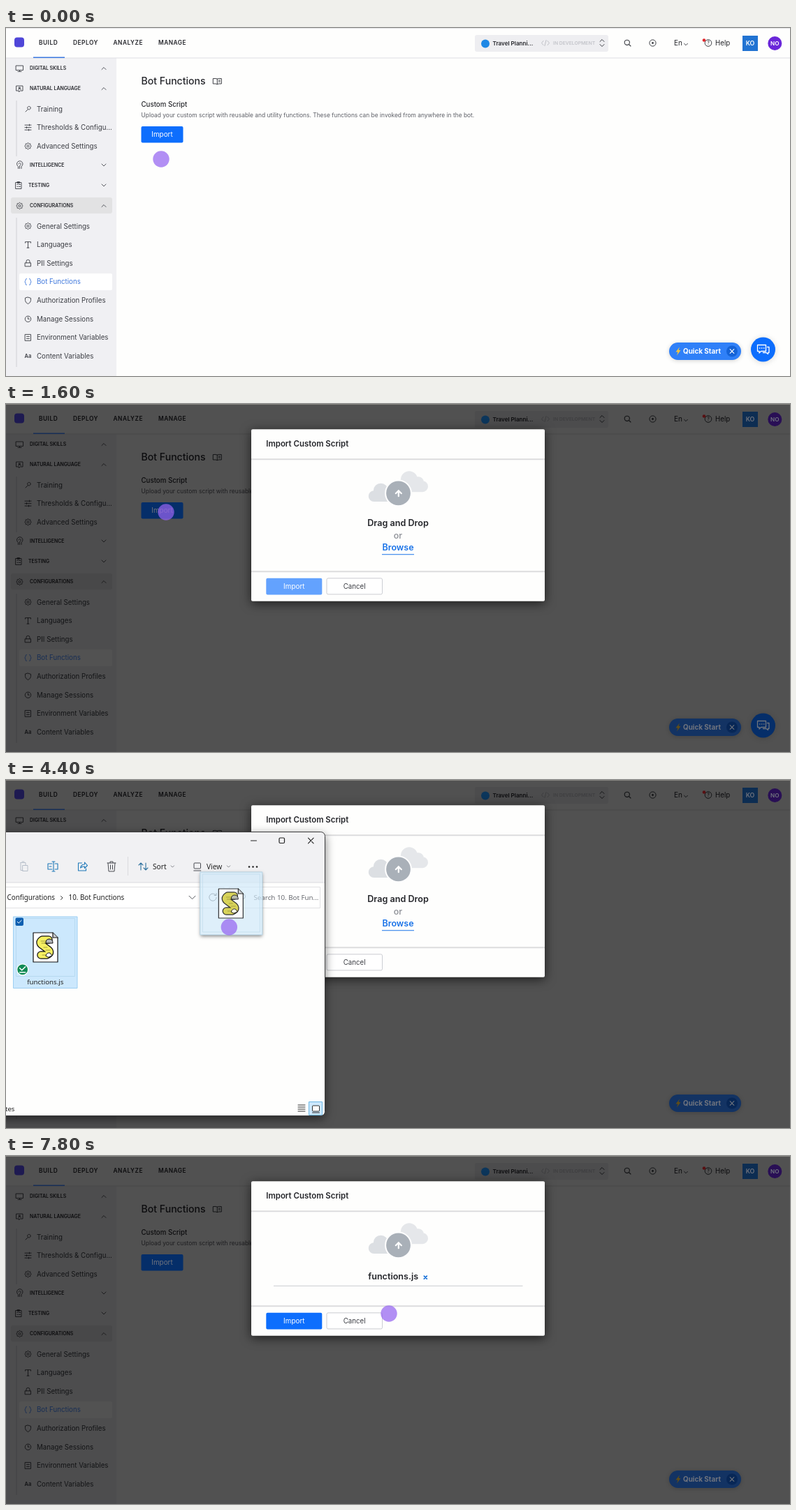
These frames come from a looping animation (1122x499 px, 8 s). An HTML page with a canvas:

```html
<!DOCTYPE html>
<html lang="en">
<head>
<meta charset="utf-8">
<title>Import custom script</title>
<style>
html, body { margin: 0; width: 100%; height: 100%; overflow: hidden; background: #fefefe; }
canvas { display: block; }
</style>
</head>
<body>
<canvas id="stage" width="1122" height="499"></canvas>
<script>
const ctx = document.getElementById('stage').getContext('2d');
const LOOP = 8000, STEP = 200, TAU = Math.PI * 2;
const UI = 'Inter, sans-serif', SYSTEM = '"Noto Sans", "Open Sans", sans-serif';
const BLUE = '#0d6efd', INK = '#25262b', SOFT = '#3c3e44', PAPER = '#fefefd';
let dimmed = false;

// Saturated colours stay a little brighter than greys behind the modal.
function tone(hex) {
  if (!dimmed) return hex;
  const rgb = [1, 3, 5].map(i => parseInt(hex.slice(i, i + 2), 16));
  const k = 0.32 + 0.1 * (Math.max(...rgb) - Math.min(...rgb)) / 255;
  return `rgb(${rgb.map(v => Math.round(v * k))})`;
}
const onAccent = () => dimmed ? '#70747e' : '#ffffff';

function text(s, x, y, size, color = INK, weight = 400, opt = {}) {
  ctx.font = `${weight} ${size}px ${opt.font || UI}`;
  ctx.textAlign = opt.align || 'left';
  ctx.letterSpacing = (opt.spacing || 0) + 'px';
  ctx.fillStyle = color;
  ctx.fillText(s, x, y + size * 0.36);
}
function box(x, y, w, h, fill, r = 0, stroke, lw = 1) {
  ctx.beginPath();
  ctx.roundRect(x, y, w, h, r);
  if (fill) { ctx.fillStyle = fill; ctx.fill(); }
  if (stroke) { ctx.strokeStyle = stroke; ctx.lineWidth = lw; ctx.stroke(); }
}
function disc(x, y, r, fill, stroke, lw = 1) {
  ctx.beginPath();
  ctx.arc(x, y, r, 0, TAU);
  if (fill) { ctx.fillStyle = fill; ctx.fill(); }
  if (stroke) { ctx.strokeStyle = stroke; ctx.lineWidth = lw; ctx.stroke(); }
}
function path(d, x, y, color, lw = 1, fill) {
  const p = new Path2D(d);
  ctx.save();
  ctx.translate(x, y);
  ctx.lineCap = ctx.lineJoin = 'round';
  if (fill) { ctx.fillStyle = fill; ctx.fill(p); }
  if (color) { ctx.strokeStyle = color; ctx.lineWidth = lw; ctx.stroke(p); }
  ctx.restore();
}
function shadowed(color, blur, dy, draw) {
  ctx.save();
  ctx.shadowColor = color;
  ctx.shadowBlur = blur;
  ctx.shadowOffsetY = dy;
  draw();
  ctx.restore();
}
const chevron = (x, y, up, color, s = 3) =>
  path(`M${-s} ${up ? s / 2 : -s / 2}L0 ${up ? -s / 2 : s / 2}L${s} ${up ? s / 2 : -s / 2}`, x, y, color);
const cross = (x, y, s, color, lw) => path(`M${-s} ${-s}L${s} ${s}M${s} ${-s}L${-s} ${s}`, x, y, color, lw);

const icons = {
  screen: 'M-5 -4H5V2.500H-5ZM0 2.500V4.500M-2.500 4.500H2.500',
  speech: 'M-4.500 -4H4.500V3H1L-1 4.500V3H-4.500ZM-2 1Q0 -1 2 1M-.8 -2H.8V-.5H-.8Z',
  head: 'M-2 5V2A4.200 4.200 0 1 1 2.500 2V5M-1.500 -1.500A1.600 1.600 0 1 1 1 0L0 1.500V5',
  clipboard: 'M-4 -4H4V5H-4ZM-1.500 -5H1.500V-3H-1.500ZM-2 -1H-1M.5 -1H2.500M-2 2H-1M.5 2H2.500',
  wrench: 'M-3.500 4L0 .5M0 .5A2.300 2.300 0 1 1 1.500 1Z',
  sliders: 'M-4.500 -3.500H4.500M-4.500 0H4.500M-4.500 3.500H4.500M2 -4.500V-2.500M-2 -1V1M1 2.500V4.500',
  letter: 'M-4 -2.500V-4H4V-2.500M0 -4V4.500M-1.500 4.500H1.500',
  lock: 'M-4 -.5H4V4.500H-4ZM-2.500 -.5V-2.500A2.500 2.500 0 0 1 2.500 -2.500V-.5',
  braces: 'M-2 -4.500Q-3.500 -4.500 -3.500 -2.500T-4.800 0Q-3.500 0 -3.500 2.500T-2 4.500M2 -4.500Q3.500 -4.500 3.500 -2.500T4.800 0Q3.500 0 3.500 2.500T2 4.500',
  shield: 'M0 -4.500L4 -3.200V0Q4 3 0 5Q-4 3 -4 0V-3.200Z',
  page: 'M-4 -4.500H4V4.500H-4ZM-2 -1.500H2M-2 1.500H2'
};
function icon(name, x, y, color) {
  if (name === 'gear') {
    disc(x, y, 1.5, null, color, 0.9);
    ctx.beginPath();
    for (let i = 0; i <= 48; i++) {
      const a = i / 48 * TAU, r = 4.1 + 0.6 * Math.cos(a * 8);
      ctx.lineTo(x + r * Math.cos(a), y + r * Math.sin(a));
    }
    ctx.stroke();
  } else if (name === 'clock') {
    disc(x, y, 4.2, null, color, 0.9);
    path('M0 -2.500V0H2', x, y, color, 0.9);
  } else if (name === 'Aa') text('Aa', x, y, 7.5, color, 600, { align: 'center' });
  else path(icons[name], x, y, color, 0.9);
}

const groups = [
  ['DIGITAL SKILLS', 58, 'screen', true], ['NATURAL LANGUAGE', 87, 'speech', true],
  ['INTELLIGENCE', 196.5, 'head', false], ['TESTING', 225.5, 'clipboard', false],
  ['CONFIGURATIONS', 255, 'gear', true]
];
const languageItems = [['Training', 'wrench'], ['Thresholds & Configu...', 'sliders'], ['Advanced Settings', 'gear']];
const configItems = [
  ['General Settings', 'gear'], ['Languages', 'letter'], ['PII Settings', 'lock'], ['Bot Functions', 'braces'],
  ['Authorization Profiles', 'shield'], ['Manage Sessions', 'clock'], ['Environment Variables', 'page'], ['Content Variables', 'Aa']
];

function sidebar() {
  box(0, 43, 158, 456, tone('#f0f0f3'));
  box(7, 243, 145, 23, tone('#e2e2e3'), 3);
  box(19, 352, 133, 24, tone('#ffffff'), 2);
  box(14.5, 104, 1, 80, tone('#cfcfd5'));
  box(14.5, 272, 1, 214, tone('#cfcfd5'));
  for (const [label, y, name, open] of groups) {
    icon(name, label === 'TESTING' ? 18 : 19.5, y, tone(SOFT));
    text(label, label === 'TESTING' ? 32 : 34, y, 6.92, tone(INK), 600);
    chevron(140, y, open, tone('#55575e'));
  }
  const rows = (items, top) => items.forEach(([label, name], i) => {
    const y = top + i * 26.65, color = tone(label === 'Bot Functions' ? '#3f78dc' : SOFT);
    icon(name, 31.5, y, color);
    text(label, 44, y, 9.73, color);
  });
  rows(languageItems, 116);
  rows(configItems, 284);
}

function header() {
  box(0, 42.5, 1122, 1, tone('#dfdfe3'));
  box(12, 13.5, 14, 14, tone('#4f46d8'), 4);
  [['BUILD', 47], ['DEPLOY', 96], ['ANALYZE', 153.5], ['MANAGE', 218]].forEach(([s, x]) =>
    text(s, x, 21, 8.34, tone(INK), 600, { spacing: 0.5 }));
  box(39, 41.5, 45, 1.6, tone('#3b78e0'));

  box(671, 10, 191, 24, tone('#eeeef1'), 3);
  disc(686, 22.5, 6, tone('#1e88e5'));
  text('Travel Planni...', 696.5, 22, 8.1, tone(INK), 600);
  path('M-3 -3L-5.500 0L-3 3M3 -3L5.500 0L3 3M1 -4L-1 4', 772, 21.5, tone('#b9bac0'), 0.9);
  text('IN DEVELOPMENT', 783, 21.5, 6.8, tone('#c3c4ca'), 600);
  chevron(853, 18, true, tone(SOFT));
  chevron(853, 25, false, tone(SOFT));

  disc(888.8, 20.8, 3.6, null, tone(SOFT), 1.1);
  path('M0 0L2.500 2.500', 891.5, 23.5, tone(SOFT), 1.1);
  disc(925.5, 21.5, 4.6, null, tone(SOFT));
  disc(925.5, 21.5, 1.4, tone(SOFT));
  text('En', 956, 21.5, 10, tone(INK));
  chevron(973, 23.5, false, tone(SOFT), 2.4);
  disc(1005, 21.5, 4.8, null, tone(SOFT));
  text('?', 1005, 21.5, 7, tone(SOFT), 500, { align: 'center' });
  disc(999, 17.5, 2.3, tone('#e0282e'));
  text('Help', 1015, 21.5, 9.73, tone(INK));
  box(1054, 11, 22, 22, tone('#2173d2'));
  text('KO', 1065, 21.5, 8.8, onAccent(), 600, { align: 'center' });
  disc(1100.3, 22, 10, tone('#6a26d9'));
  text('NO', 1100.3, 22, 8.2, onAccent(), 600, { align: 'center' });
}

function quickStart(withChat) {
  shadowed('rgba(0,0,0,.18)', 6, 1, () => box(949, 451, 103, 25, tone('#2f80f8'), 12.5));
  path('M2 -6L-3.500 1H-.5L-2 6L3.500 -1.500H.5Z', 962, 463.5, null, 1, tone('#f8c53a'));
  text('Quick Start', 969, 463.5, 9.9, onAccent(), 700);
  disc(1039, 463.5, 8, tone('#1463d8'));
  cross(1039, 463.5, 2.8, onAccent(), 1.1);
  if (!withChat) return;
  shadowed('rgba(0,0,0,.15)', 8, 1, () => disc(1083.5, 461, 17.5, tone(BLUE)));
  path('M-8 -6H4V3H-3L-5.500 5.500V3H-8ZM6 -3H8.500V5H7V7L4.500 5H0M-5 -1.500H-4.500M-2 -1.500H-1.500M1 -1.500H1.500', 1083.5, 460.5, onAccent(), 1.3);
}

function page(withChat) {
  box(0, 0, 1122, 499, tone(PAPER));
  sidebar();
  header();
  text('Bot Functions', 193.5, 75.8, 14.1, tone(INK), 500);
  path('M0 -3.500Q-2 -4.500 -6 -4V3.500Q-2 3 0 4.200Q2 3 6 3.500V-4Q2 -4.500 0 -3.500V4M2 -1.500H4M2 .5H4', 302.3, 76.5, tone(SOFT), 1);
  text('Custom Script', 193.5, 109.2, 9.7, tone(INK), 500);
  text('Upload your custom script with reusable and utility functions. These functions can be invoked from anywhere in the bot.',
    193.5, 124.8, 8.41, tone('#5c5e66'));
  box(193.5, 141, 60, 23.5, tone(BLUE), 2);
  text('Import', 223.5, 152.7, 9.9, onAccent(), 400, { align: 'center' });
  quickStart(withChat);
  box(0, 0, 1122, 1, dimmed ? '#84837f' : '#e4e4e6');
}

function cloud(x, y, s, color) {
  ctx.fillStyle = color;
  ctx.beginPath();
  for (const [dx, dy, r] of [[-14, 0, 9], [-3, -9, 12], [10, -5, 8], [16, 1, 8]]) {
    ctx.moveTo(x + dx * s, y + dy * s);
    ctx.arc(x + dx * s, y + dy * s, r * s, 0, TAU);
  }
  ctx.rect(x - 14 * s, y - 4 * s, 30 * s, 13 * s);
  ctx.fill();
}

function dialog(top, hasFile) {
  const foot = hasFile ? 179 : 204, height = hasFile ? 221.5 : 246.5;
  ctx.save();
  ctx.translate(0, top);
  shadowed('rgba(0,0,0,.65)', 15, 3, () => box(351, 0, 420, height, PAPER, 2));
  text('Import Custom Script', 372.3, 20.5, 11.45, INK, 600);
  for (const y of [42, foot - 1]) box(351, y, 420, 2, '#dcdcde');
  cloud(580, 81, 1, '#e5e7ea');
  cloud(539, 96, 0.88, '#dcdfe3');
  disc(561.5, 91.7, 18.4, '#a9b0b8', '#ffffff', 2);
  path('M0 4V-4M-4 0L0 -4L4 0', 561.8, 92, '#ffffff', 2.2);
  if (hasFile) {
    text('functions.js', 518.3, 136.3, 12.6, INK, 600);
    cross(600.3, 138, 2, '#1670d8', 1.7);
    box(383, 149.5, 356.5, 1, '#c9cbd0');
  } else {
    const mid = { align: 'center' };
    text('Drag and Drop', 561, 134, 12.6, INK, 600, mid);
    text('or', 561, 152.3, 12.5, '#8c8f96', 500, mid);
    text('Browse', 561, 169.7, 12.5, '#1a73e8', 600, mid);
    box(538, 179, 46, 1, '#1a73e8');
  }
  const by = foot + 9.5;
  box(372.3, by, 80, 23.7, hasFile ? BLUE : '#63a2fe', 2);
  text('Import', 412.3, by + 11.7, 9.9, '#ffffff', 400, { align: 'center' });
  box(459, by + 0.2, 79.5, 23, '#ffffff', 2, '#cbcdd2');
  text('Cancel', 498.7, by + 11.7, 9.73, SOFT, 400, { align: 'center' });
  ctx.restore();
}

function scriptIcon(x, y) {
  path('M-17 -21H11L18 -14V21H-17Z', x, y, '#111111', 1.2, '#ffffff');
  path('M11 -21V-14H18', x, y, '#111111', 1.2, '#c9ccd0');
  const scroll = 'M5 -11H-4Q-10 -7 -4 -3L4 3Q10 8 2 11H-6';
  path(scroll, x, y, '#111111', 11.5);
  path(scroll, x, y, '#f6f062', 9);
  path('M-6 -9H3M-5 -6H1M-2 0H3M1 4H7M-4 11H3', x, y, '#8f8a34', 0.8);
  path('M1 -7Q1 -12 6 -12Q11 -12 11 -6H3Z', x, y, '#111111', 1, '#b4b7bc');
  path('M1 12Q2 7 7 8L10 12L5 14Z', x, y, '#111111', 1, '#ffffff');
}

function explorer() {
  const sys = { font: SYSTEM }, line = '#4a4c52', accent = '#1f78b8';
  ctx.save();
  shadowed('rgba(0,0,0,.55)', 14, 4, () => box(-20, 74.5, 476.5, 407, PAPER, 6));
  ctx.beginPath();
  ctx.roundRect(-20, 74.5, 476.5, 407, 6);
  ctx.clip();
  box(0, 74, 458, 73, '#f1f1f3');
  box(0, 146.5, 458, 1, '#dcdce0');
  path('M0 0H8', 350.5, 87, '#222222');
  box(391, 83, 7.5, 7.5, null, 1.5, '#222222', 1.2);
  cross(436.3, 87, 3.8, '#222222', 1.1);

  path('M-4 -5H3V-1M-4 -5V6H-1M-1 -1H6V7H-1ZM-2 -6.500H1', 25, 123.5, '#b7bfca', 1);
  path('M-1 -4H-7V4H-1M3 -4H7V4H3M1 -7V7M-1 -7H3M-1 7H3M-5 0H-2', 67, 124, accent, 1.1);
  path('M-1 -5H-6V6H5V3M-3 2Q-2 -3 3 -3V-6L7 -1.500L3 2.500V0Q-1 0 -3 2Z', 109.5, 124, accent, 1.1);
  path('M-6 -5H6M-2 -5V-7H2V-5M-5 -5L-4 7H4L5 -5M-1.500 -2V4M1.500 -2V4', 151, 124, line, 1);
  box(174, 110, 1, 27, '#dadade');
  path('M-3 5V-5M-6 -2L-3 -5L0 -2M4 -5V5M1 2L4 5L7 2', 196, 124, '#31739f', 1.1);
  text('Sort', 210, 124, 10.2, '#222222', 400, sys);
  chevron(238.3, 124, false, '#85878c', 2.2);
  box(269, 119, 9.5, 8, null, 1, line);
  path('M0 0H10', 268.8, 130, line);
  text('View', 287, 124, 10.2, '#222222', 400, sys);
  chevron(318.5, 124, false, '#85878c', 2.2);
  for (const x of [348, 353.5, 359]) disc(x, 124.5, 1.3, '#222222');

  box(-10, 153.5, 322, 30, '#ffffff', 0, '#e1e1e4');
  box(319.5, 153.5, 130, 30, '#ffffff', 0, '#e1e1e4');
  text('Configurations', 1.5, 168.5, 9.85, '#222222', 400, sys);
  path('M-1.500 -2.500L1 0L-1.500 2.500', 80, 169, '#333333');
  text('10. Bot Functions', 89.5, 168.5, 9.85, '#222222', 400, sys);
  chevron(266.5, 168.5, false, '#55575c', 4.5);
  path('M4.500 -2.500A5.200 5.200 0 1 0 5.200 .5M5 -5.500V-2.500H2', 296, 168, '#55575c', 1);
  disc(339, 167, 3.4, null, '#777a80');
  path('M0 0L-4 4', 336.5, 169.5, '#777a80');
  text('Search 10. Bot Fun...', 354.5, 168.5, 9.75, '#66686e', 400, sys);

  box(10.5, 196, 91.5, 102.5, '#cce8fd', 0, '#9dcff2');
  box(14.5, 198.5, 84, 83, null, 0, '#b3d6ee', 0.8);
  box(13.5, 197.5, 11.5, 11.5, '#0d5fb0', 2);
  path('M-3 0L-1 2L3 -2', 19.2, 203.2, '#ffffff');
  scriptIcon(56, 240);
  disc(23.7, 271.8, 8, '#0f8a55', '#ffffff', 1.2);
  path('M-4 -2L-1 1L4 -4M-4 4H4', 23.7, 271.8, '#ffffff', 1.5);
  text('functions.js', 56.3, 289.5, 9.7, '#222222', 400, { ...sys, align: 'center' });

  text('tes', -1, 472, 9.6, '#222222', 400, sys);
  path('M0 0H10M0 3H10M0 6H10M0 9H10', 418, 466, '#333333');
  box(433.5, 461.5, 19, 19, '#cce8fd', 0, '#6db8e6');
  box(438.5, 467, 10, 8, '#ffffff', 1, '#333333');
  path('M0 0H10', 438.5, 477, '#333333');
  ctx.restore();
  box(-20, 74.5, 476.5, 407, null, 6, '#3d3d3e');
}

function ghost({ x, y }) {
  const left = x - 41.5, top = y - 79, w = 89, h = 90;
  // Keep the shadow outside the translucent tile.
  ctx.save();
  ctx.beginPath();
  ctx.rect(0, 0, 1122, 499);
  ctx.rect(left, top, w, h);
  ctx.clip('evenodd');
  shadowed('rgba(0,0,0,.5)', 5, 2, () => box(left, top, w, h, '#ffffff'));
  ctx.restore();
  box(left, top, w, h, 'rgba(208,233,250,.68)', 0, '#b5d3e4');
  box(left + 3.5, top + 3, w - 7, h - 7, null, 0, '#c0dcec', 0.8);
  ctx.save();
  ctx.globalAlpha = 0.85;
  scriptIcon(x + 2, y - 34);
  ctx.restore();
}
function copyLabel({ x, y }) {
  box(x + 10.5, y + 12.5, 49, 17.5, '#fdfdff', 2, '#e6e6ea');
  path('M-4.500 0H4.500M0 -4.500V4.500', x + 20, y + 21.3, '#444a60');
  text('Copy', x + 29, y + 21.5, 10.2, '#2d3f9c', 400, { font: SYSTEM });
}

const route = [
  [0, 222, 188], [200, 223, 182], [400, 227, 163], [600, 229, 155], [2400, 229, 155],
  [2600, 255, 171], [2800, 238, 178], [3200, 135, 222], [3400, 94, 240], [3600, 80, 243], [3800, 80, 243],
  [4000, 98, 243], [4600, 430, 195], [4800, 493, 187], [5000, 525, 187], [5200, 541, 187],
  [7200, 541, 187], [7400, 572, 208], [7600, 605, 226], [7800, 548, 226]
];
function cursorAt(t) {
  const i = route.findIndex(k => k[0] >= t);
  if (i <= 0) return { x: route[0][1], y: route[0][2] };
  const [t0, x0, y0] = route[i - 1], [t1, x1, y1] = route[i], p = (t - t0) / (t1 - t0);
  return { x: x0 + (x1 - x0) * p, y: y0 + (y1 - y0) * p };
}
function cursor({ x, y }, pressed) {
  disc(x, y, 11.7, pressed ? '#4d1fae' : 'rgba(148,100,240,.72)');
  if (pressed) disc(x, y, 2.6, '#e9e0fb');
}

function draw(t) {
  const pos = cursorAt(t), hasFile = t >= 5800;
  const exploring = t >= 2600 && !hasFile, dragging = t >= 4000 && !hasFile;
  dimmed = t >= 800;
  page(t < 2600);
  if (dimmed) dialog(t < 1000 ? 23.5 : 36.2, hasFile);
  if (exploring) explorer();
  if (dragging) ghost(pos);
  cursor(pos, (t >= 600 && t < 1200) || t === 3800);
  if (dragging && pos.x > 457) copyLabel(pos);
}

const start = performance.now();
function tick() {
  const t = (performance.now() - start) % LOOP;
  draw(Math.floor(t / STEP) * STEP);
  requestAnimationFrame(tick);
}
tick();
</script>
</body>
</html>
```
